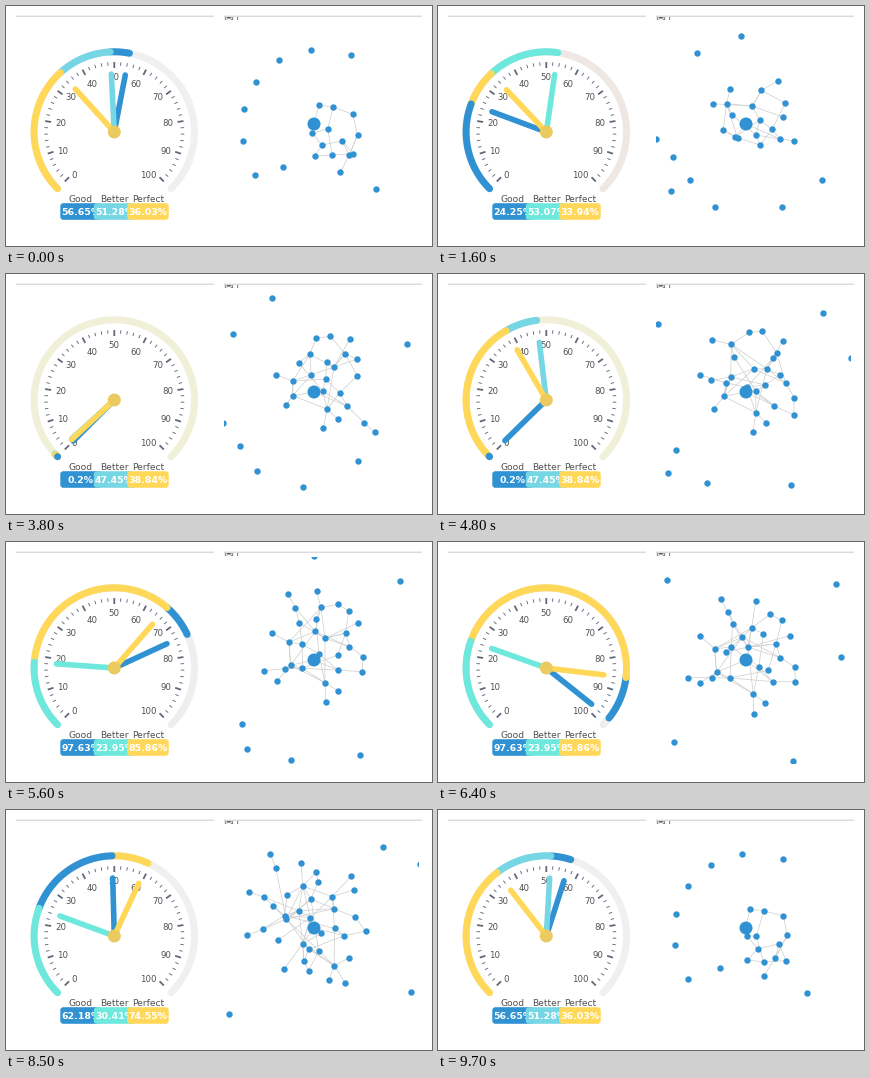
These frames come from a looping animation (426 by 240 pixels, 9.8 s). A matplotlib script:

```python
import numpy as np
import matplotlib.pyplot as plt
from matplotlib.animation import FuncAnimation
from matplotlib.collections import LineCollection
from matplotlib.patches import Circle, FancyBboxPatch, Rectangle

W, H, DPI = 426, 240, 100
STEP, LOOP = 100, 9800
PT = 72 / DPI  # points per pixel

# The clip restarts shortly before the loop ends, after a short freeze.
LEAD, CLIP_END = 500, 9200

BLUE, YELLOW, TEAL, SKY = "#3092d2", "#ffd859", "#6ee8dc", "#76d6e4"
INK, TICK = "#505050", "#63677a"

fig = plt.figure(figsize=(W / DPI, H / DPI), dpi=DPI, facecolor="white")
ax = fig.add_axes([0, 0, 1, 1])
ax.set(xlim=(0, W), ylim=(H, 0))
ax.axis("off")


def line(xs, ys, color, width, z, cap="round"):
    return ax.plot(xs, ys, color=color, lw=width * PT, zorder=z,
                   solid_capstyle=cap, snap=False)[0]


def label(x, y, text, size, color=INK, z=3, **kw):
    kw = {"family": "DejaVu Sans", "ha": "center",
          "va": "center_baseline", **kw}
    return ax.text(x, y, text, fontsize=size * PT, color=color, zorder=z, **kw)


# ---- page rules and the cut-off heading
for x0, x1 in ((10, 208), (218, 416)):
    line([x0, x1], [10.2, 10.2], "#cccccc", 1, 1, "butt")
heading = label(217.5, 13, "関下", 10, family="Noto Sans CJK JP",
                ha="left", va="baseline")
heading.set_clip_on(True)
heading.set_clip_path(Rectangle((217, 10.6), 40, 6, transform=ax.transData))

# ---- gauge
CX, CY, RADIUS = 108.3, 126, 80.2
FIRST, PERIOD, BOUNCE_MS = -133, 1465, 732

# values, track tint, middle colour
STATES = [
    ((56.65, 51.28, 36.03), "#f0f0f0", SKY),
    ((24.25, 53.07, 33.94), "#eee7e4", TEAL),
    ((4.92, 13.39, 52.72), "#f0f0d9", TEAL),
    ((0.2, 47.45, 38.84), "#f0f0d9", SKY),
    ((97.63, 23.95, 85.86), "#eeeeee", TEAL),
    ((10.37, 97.66, 90.3), "#eeeeee", TEAL),
    ((62.18, 30.41, 74.55), "#f0f0f0", TEAL),
]


def polar(value, r):
    a = np.radians(-135 + 2.7 * np.asarray(value, float))
    return CX + r * np.sin(a), CY - r * np.cos(a)


def bounce(k):
    k = min(k, 1)
    for limit, shift, base in ((1, 0, 0), (2, 1.5, .75), (2.5, 2.25, .9375)):
        if k < limit / 2.75:
            return 7.5625 * (k - shift / 2.75) ** 2 + base
    return 7.5625 * (k - 2.625 / 2.75) ** 2 + .984375


def dial_label(value, r=60, size=8.6):
    """Number pushed inwards, so that its edge touches the radius."""
    x, y = polar(value, r)
    ux, uy = (x - CX) / r, (y - CY) / r
    ha = "left" if ux < -.4 else "right" if ux > .4 else "center"
    label(x, y + (4.5 if uy < -.8 else 0), str(value), size, ha=ha)


track = line(*polar(np.linspace(0, 100, 150), RADIUS), "#f0f0f0", 7, 1)
for v in range(0, 101, 2):
    major = v % 10 == 0
    xs, ys = zip(polar(v, 70), polar(v, 64 if major else 66.5))
    line(xs, ys, TICK, 1.8 if major else 0.9, 2, "butt")
    if major:
        dial_label(v)

arcs, hands, badges, readings = [], [], [], []
for n, (name, x, color) in enumerate((("Good", 75, BLUE),
                                      ("Better", 108.5, TEAL),
                                      ("Perfect", 142, YELLOW))):
    arcs.append(line([], [], color, 7, 2))
    hands.append(line([], [], color, 5.6, 5 + n))
    label(x, 192, name, 9.1)
    box = FancyBboxPatch((x - 20.7, 197.2), 41.4, 16.6, fc=color, ec="none",
                         boxstyle="round,pad=0,rounding_size=3",
                         zorder=5 + 2 * n)
    badges.append(ax.add_patch(box))
    readings.append(label(x, 205.3, "", 9.4, "white", 6 + 2 * n,
                          weight="bold"))
ax.add_patch(Circle((CX, CY), 6.5, fc="#ebcb60", ec="none", zorder=9))


def draw_gauge(clip):
    state, age = divmod(clip - FIRST, PERIOD)
    values, tint, middle = STATES[state]
    grow = bounce(age / BOUNCE_MS)
    track.set_color(tint)
    low = 0
    for rank, n in enumerate(np.argsort(values)):
        now = values[n] * grow
        arcs[n].set_data(*polar(np.linspace(low, now, 100), RADIUS))
        arcs[n].set_zorder(2 - 0.1 * rank)
        hands[n].set_data(*zip((CX, CY), polar(now, 58)))
        readings[n].set_text(f"{values[n]:g}%")
        low = now
    for art in (arcs[1], hands[1]):
        art.set_color(middle)
    badges[1].set_facecolor(middle)


# ---- growing force-directed network around a fixed hub
HUB = np.array([308.0, 118.0])
FRICTION, GRAVITY, REPEL, REST = 0.5, 0.1, 26, 2
START_NODES, START_LINKED, START_CROSS = 22, 12, 4
WARM_UP, SUBSTEPS, GROW_EVERY = 150, 2, 7


def relax(pos, links):
    """One step of springs, gravity and mutual repulsion."""
    old = pos.copy()
    for a, b in links:
        v = pos[b] - pos[a]
        d = np.hypot(*v) + 1e-6
        pull = 0.5 * FRICTION * (d - REST) * v / d
        pos[a] += pull
        pos[b] -= pull
        pos[0] = HUB
    pos += (HUB - pos) * GRAVITY * FRICTION
    gap = pos[:, None] - pos[None]
    dist2 = np.maximum((gap ** 2).sum(axis=2), 40)
    push = (gap * 2 * REPEL / dist2[..., None]).sum(axis=1)
    pos += FRICTION * (pos - old + push)
    pos[0] = HUB


def simulate(frames, seed=12):
    rng = np.random.default_rng(seed)
    pos = HUB + rng.uniform(-90, 90, (START_NODES, 2))
    links, cluster = [], [0]

    def attach():
        node = rng.choice([k for k in range(len(pos)) if k not in cluster])
        links.append((rng.choice(cluster), node))
        cluster.append(node)

    def cross():
        links.append(tuple(rng.choice(cluster, 2, replace=False)))

    for _ in range(START_LINKED):
        attach()
    for _ in range(START_CROSS):
        cross()
    for _ in range(WARM_UP):
        relax(pos, links)

    history = []
    for step in range(frames * SUBSTEPS):
        if step % GROW_EVERY == GROW_EVERY - 1:
            pos = np.vstack([pos, HUB + rng.uniform(-90, 90, 2)])
            attach()
            cross()
        relax(pos, links)
        if step % SUBSTEPS == 0:
            history.append((pos.copy(), [pos[list(e)] for e in links]))
    return history


NETWORK = simulate(CLIP_END // STEP + 1)

view = Rectangle((218, 14.5), 193.5, 206.5, transform=ax.transData)
wires = LineCollection([], colors="#cdcdcd", linewidths=0.7 * PT, zorder=2)
ax.add_collection(wires)
dots = ax.scatter([], [], s=(6.4 * PT) ** 2, c=BLUE, linewidths=0, zorder=3)
for art in (wires, dots):
    art.set_clip_path(view)
ax.add_patch(Circle(HUB, 6.5, fc=BLUE, ec="none", zorder=4))


def draw_network(clip):
    pos, segments = NETWORK[clip // STEP]
    dots.set_offsets(pos)
    wires.set_segments(segments)


def update(i):
    clip = min((i * STEP + LEAD) % LOOP, CLIP_END)
    draw_gauge(clip)
    draw_network(clip)
    return []


anim = FuncAnimation(fig, update, frames=LOOP // STEP, interval=STEP,
                     init_func=lambda: update(0), repeat=True, repeat_delay=0)
plt.show()
```
